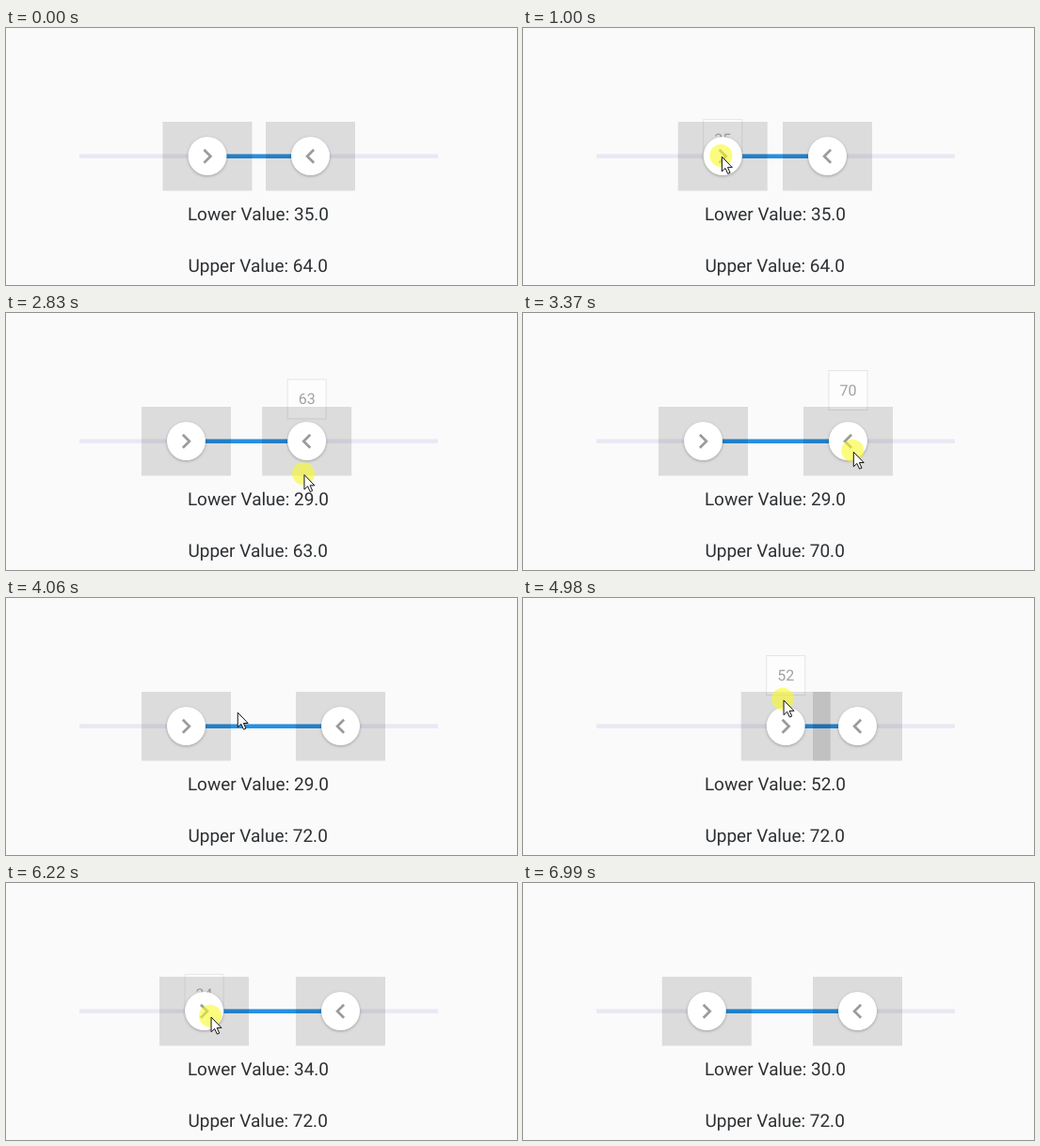
An HTML page for the animation above (7.77 s loop, 543x274 px).

```html
<!DOCTYPE html>
<html lang="en">
<head>
<meta charset="utf-8">
<title>Range slider</title>
<style>
  html, body { margin: 0; width: 100%; height: 100%; overflow: hidden; background: #fafafa; }
  svg { display: block; width: 100%; height: 100%; font-family: Roboto, sans-serif; text-rendering: geometricPrecision; }
  .label { font-size: 19px; fill: #2d3033; }
  .thumb { fill: #fff; filter: drop-shadow(0 1.5px 1.8px rgba(0, 0, 0, .28)); }
  .chevron { fill: none; stroke: #9b9b9b; stroke-width: 2.7; }
  .tip rect { fill: #fdfdfd; stroke: #e5e5e5; }
  .tip text { font-size: 16px; fill: #a2a2a0; text-anchor: middle; }
</style>
</head>
<body>
<svg viewBox="0 0 543 274">
  <defs>
    <g id="knob">
      <rect x="-47.5" y="100" width="95" height="73.5" fill="#000" fill-opacity=".12"/>
      <circle class="thumb" cy="136.5" r="20.5"/>
    </g>
  </defs>
  <rect x="78" y="134.5" width="381" height="4.3" fill="#e8e9f5"/>
  <rect id="range" y="134.5" height="4.5" fill="#2790e2"/>

  <g id="lower">
    <g class="tip"><rect x="-20.5" y=".5" width="41" height="42"/><text y="27"></text></g>
    <use href="#knob"/>
    <path class="chevron" d="M-3.6 129.8 3.4 136.8-3.6 143.8"/>
  </g>
  <g id="upper">
    <g class="tip"><rect x="-20.5" y=".5" width="41" height="42"/><text y="27"></text></g>
    <use href="#knob"/>
    <path class="chevron" d="M3.6 129.8-3.4 136.8 3.6 143.8"/>
  </g>

  <text class="label" id="lowerLabel" x="192.9" y="204.8"></text>
  <text class="label" id="upperLabel" x="193.4" y="259.8"></text>

  <g id="cursor">
    <circle id="highlight" r="12" fill="#f8fa28" fill-opacity=".6"/>
    <path transform="translate(.5 .8)" d="M.5 .5V16.2L4.1 12.8 6.8 18.6 9.2 17.5 6.6 11.9H11.4Z" fill="#fff" stroke="#111"/>
  </g>
</svg>
<script>
  const LOOP = 7770, TIP_TIME = 234, DRAG_LAG = 25;
  const $ = id => document.getElementById(id);
  const clamp = (v, min = 0, max = 1) => Math.min(max, Math.max(min, v));
  const ease = u => u * u * (3 - 2 * u);

  // Pointer moves: start time, end time, x, y. It rests in between.
  const entry = { x: 313, y: 249, shown: 300, hidden: 6990 };
  const moves = [
    [300, 690, 226, 139],
    [840, 920, 214, 136],
    [920, 1500, 146.2, 135],
    [1690, 2040, 191.5, 137],
    [2040, 2440, 342, 158],
    [2440, 2637, 323.5, 171],
    [2750, 3060, 279, 172],
    [3060, 3430, 355.5, 145],
    [3660, 4310, 191.5, 109],
    [4310, 4750, 287.5, 103],
    [4825, 5520, 198.5, 139],
    [6140, 6240, 219, 142],
    [6240, 6500, 195.3, 142],
    [6500, 6910, 315, 231],
  ];
  const handles = [
    { id: 'lower', name: 'Lower', rest: 214, presses: [[920, 2040], [4310, 5690], [6140, 6500]] },
    { id: 'upper', name: 'Upper', rest: 323.5, presses: [[2637, 3450]] },
  ];

  function pointerAt(t) {
    let { x, y } = entry;
    for (const [start, end, toX, toY] of moves) {
      const k = ease(clamp((t - start) / (end - start)));
      x += (toX - x) * k;
      y += (toY - y) * k;
    }
    return { x, y };
  }

  // A held handle trails the pointer and stays where it was released.
  function handleX({ rest, presses }, t) {
    const press = presses.filter(([down]) => down <= t).pop();
    return press ? pointerAt(clamp(t - DRAG_LAG, ...press)).x : rest;
  }

  const isPressed = ({ presses }, t) => presses.some(([down, up]) => t >= down && t < up);

  const tipRise = ({ presses }, t) => Math.max(...presses.map(([down, up]) =>
    clamp((t - down) / TIP_TIME) - clamp((t - up) / TIP_TIME)));

  function drawHandle(handle, t) {
    const x = handleX(handle, t), rise = tipRise(handle, t);
    const value = Math.floor((x - 77.5) / 3.81);
    const group = $(handle.id), tip = group.querySelector('.tip');
    group.setAttribute('transform', `translate(${x} 0)`);
    tip.setAttribute('transform', `translate(0 ${116 - 55 * rise})`);
    tip.setAttribute('opacity', clamp(rise * 2.5));
    tip.querySelector('text').textContent = value;
    $(handle.id + 'Label').textContent = `${handle.name} Value: ${value}.0`;
    return x;
  }

  function draw(t) {
    const [left, right] = handles.map(handle => drawHandle(handle, t));
    $('range').setAttribute('x', left);
    $('range').setAttribute('width', right - left);

    const { x, y } = pointerAt(t);
    const visible = t >= entry.shown && t < entry.hidden;
    $('cursor').setAttribute('transform', `translate(${x} ${y})`);
    $('cursor').setAttribute('opacity', visible ? 1 : 0);
    $('highlight').setAttribute('opacity', handles.some(handle => isPressed(handle, t)) ? 1 : 0);
  }

  const start = performance.now();
  function tick() {
    draw((performance.now() - start) % LOOP);
    requestAnimationFrame(tick);
  }
  tick();
</script>
</body>
</html>
```
